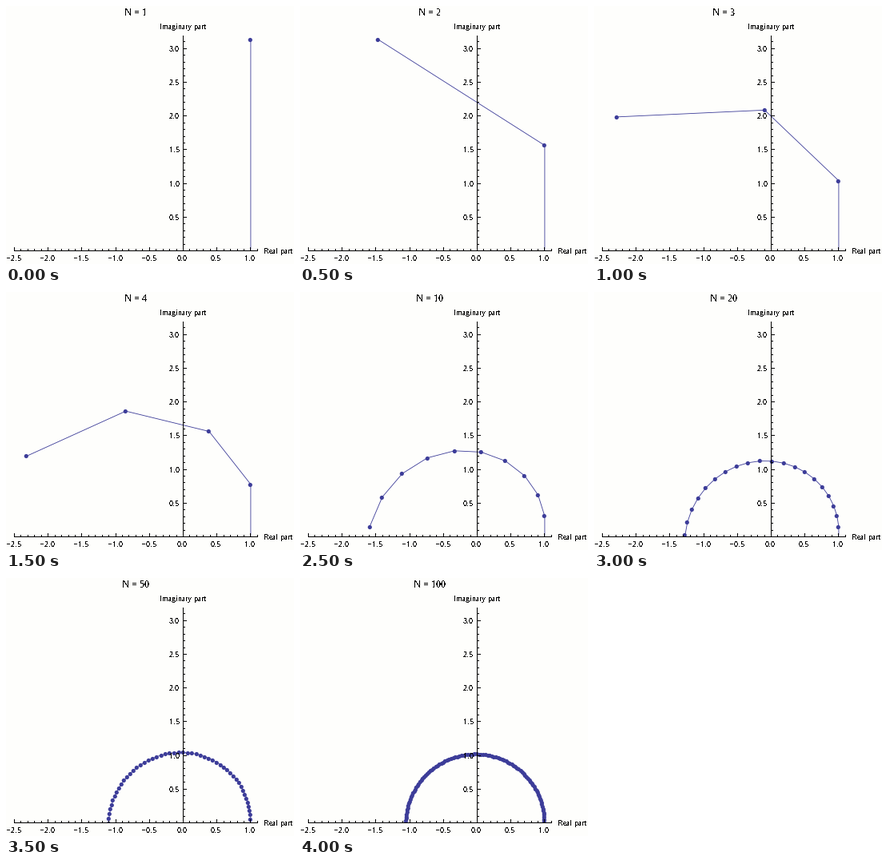
Recreate the animation shown at these times as a matplotlib script. Size 360 px wide and 323 px high, loop 4.5 s.

```python
import math

import matplotlib.pyplot as plt
from matplotlib.animation import ArtistAnimation
from matplotlib.collections import LineCollection
from matplotlib.patches import Circle, Rectangle

W, H, DPI = 360, 323, 100
PX = 72 / DPI                      # points per pixel
X0, Y0, UNIT = 221.5, 306.5, 84.4  # origin and scale of the plot in pixels
BLUE = "#3d3d99"
STEPS = (1, 2, 3, 4, 5, 10, 20, 50, 100)

plt.rcParams.update({"font.family": "Liberation Serif",
                     "text.antialiased": False,
                     "text.hinting": "default",
                     "text.hinting_factor": 1})

fig = plt.figure(figsize=(W / DPI, H / DPI), dpi=DPI, facecolor="#fefefc")
ax = fig.add_axes([0, 0, 1, 1])
ax.set_xlim(0, W)
ax.set_ylim(H, 0)
ax.axis("off")


def px(x):
    return X0 + UNIT * x


def py(y):
    return Y0 - UNIT * y


def label(x, y, text, size=10, ha="center"):
    return ax.text(x, y, text, fontsize=size * PX, ha=ha, va="baseline",
                   color="black", zorder=5)


def draw_axes():
    left, base = math.floor(X0), math.floor(Y0)
    lines = [[(10, base), (314, base)], [(left, 37), (left, base)]]
    for k in range(-25, 12):
        x = math.floor(px(k / 10))
        major = k % 5 == 0
        lines.append([(x, base), (x, base - (4 if major else 2))])
        if major:
            label(x - 0.5, 319, f"{k / 10:.1f}".replace("-", "\u2212"))
    for k in range(1, 32):
        y = math.floor(py(k / 10))
        major = k % 5 == 0
        lines.append([(left, y), (left + (4 if major else 2), y)])
        if major:
            label(217, y + 4, f"{k / 10:.1f}", ha="right")
    ax.add_collection(LineCollection(lines, colors="black", linewidths=PX,
                                     capstyle="projecting", zorder=4))
    label(220.5, 29, "Imaginary part")
    label(322, 310, "Real part", ha="left")


def draw_powers(n):
    """Powers of 1 + i*pi/n as a chain of dots, with the title."""
    pts = [(1 + 1j * math.pi / n) ** k for k in range(n + 1)]
    xs = [px(z.real) for z in pts]
    ys = [py(z.imag) + 0.6 for z in pts]
    line, = ax.plot(xs, ys, color=BLUE, lw=0.85 * PX, snap=False, zorder=2)
    # dots sit on whole pixels
    dots = [Circle((math.floor(px(z.real)) + 0.3,
                    math.ceil(py(z.imag)) + 0.5), 2.6,
                   fc=BLUE, lw=0, zorder=3) for z in pts[1:]]
    for dot in dots:
        ax.add_patch(dot)
    for part in [line, *dots]:
        part.set_clip_path(floor)
    return [line, *dots, label(162, 12, f"N = {n}", 12)]


floor = Rectangle((0, 0), W, 306, transform=ax.transData)
draw_axes()
frames = [draw_powers(n) for n in STEPS]
anim = ArtistAnimation(fig, frames, interval=500, repeat=True, repeat_delay=0)
plt.show()
```
